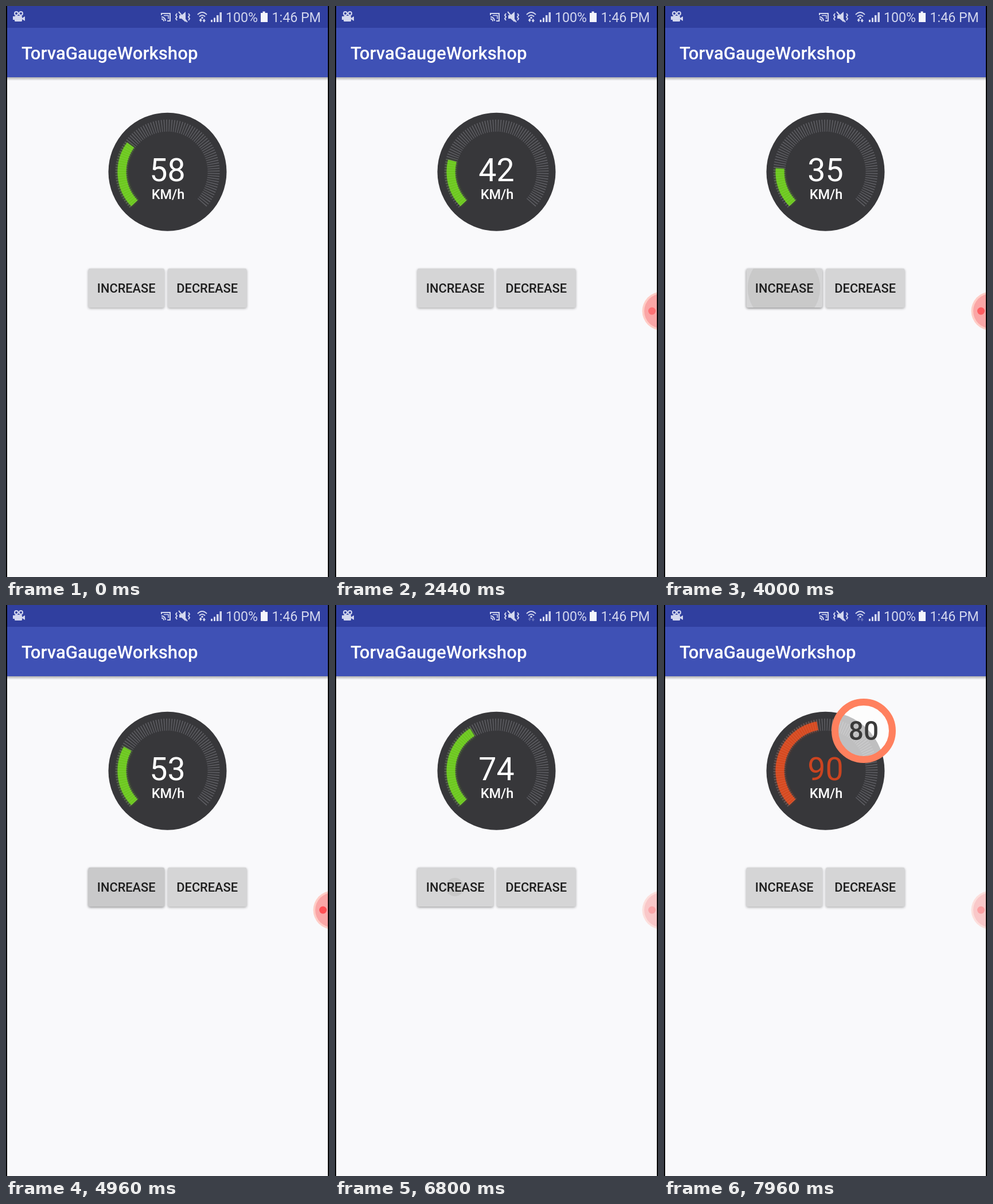
An HTML page that plays this animation: 563x994 px, repeating every 8000 ms.

```html
<!DOCTYPE html>
<html lang="en">
<head>
<meta charset="utf-8">
<title>Gauge</title>
<style>
  html, body { margin: 0; width: 100%; height: 100%; overflow: hidden; background: #000; }
  svg { display: block; width: 563px; height: 994px; font-family: Roboto, sans-serif; }
  .mid { text-anchor: middle; }
  .medium { font-weight: 500; }
  .status { fill: #d3d7ee; font-size: 23.2px; }
  .line { fill: none; stroke: #d3d7ee; stroke-width: 2; }
  .label { font-size: 21.8px; font-weight: 500; fill: #1d1d1d; }
  .arc { fill: none; }
</style>
</head>
<body>
<svg viewBox="0 0 563 994">
  <defs>
    <linearGradient id="fall" x1="0" y1="0" x2="0" y2="1">
      <stop offset="0" stop-color="#000" stop-opacity=".3"/>
      <stop offset="1" stop-color="#000" stop-opacity="0"/>
    </linearGradient>
    <filter id="soft" x="-20%" y="-20%" width="140%" height="140%"><feGaussianBlur stdDeviation="2"/></filter>
    <clipPath id="screen"><path d="M2 0H561V994H2Z"/></clipPath>
    <clipPath id="incClip"><rect x="143.5" y="457" width="132.5" height="68" rx="3"/></clipPath>
    <clipPath id="decClip"><rect x="282" y="457" width="137.5" height="68" rx="3"/></clipPath>
  </defs>

  <rect width="563" height="994"/>
  <g clip-path="url(#screen)">
    <rect width="563" height="994" fill="#f9f9fb"/>
    <rect y="124" width="563" height="6" fill="url(#fall)"/>
    <rect width="563" height="124" fill="#3f51b5"/>
    <rect width="563" height="38" fill="#303f9f"/>

    <!-- status bar -->
    <g class="status">
      <g id="camera">
        <circle cx="18" cy="13" r="3" class="line"/>
        <circle cx="26" cy="13" r="3" class="line"/>
        <rect x="15" y="17" width="13" height="10" rx="1.5"/>
        <path d="M28 21L33 18V26L28 23ZM12 18h3v6h-3z"/>
      </g>
      <g id="cast" class="line">
        <path d="M271 16V13H286V26H281M271 19a7 7 0 0 1 7 7M271 22.500a4 4 0 0 1 4 4"/>
        <path d="M275 16.500H283V22.500" stroke-width="1.500"/>
      </g>
      <g id="mute">
        <path d="M302 16H306L313 10V28L306 22H302Z"/>
        <path class="line" d="M301 10L316 28M298 13l-2 3 2 3-2 3 2 3M318 13l2 3-2 3 2 3-2 3" stroke-width="1.600"/>
      </g>
      <g id="wifi">
        <path class="line" d="M334 15Q342 7 350 15M337 18.500Q342 13.500 347 18.500" />
        <circle cx="342" cy="20.500" r="1.800"/>
        <path id="traffic" d="M336.500 24H338V22H340.500V24H342L339.200 28ZM342.500 26H344V28H346.500V26H348L345.200 22Z"/>
      </g>
      <path d="M357 28V24h3v4zM362 28V20.500h3V28zM367 28V16h3.500V28zM372.500 28V11H376V28z"/>
      <text x="383" y="27.700">100%</text>
      <path d="M444 12h3.500v-2.500h4V12H456V28H444Z" fill="#f4f5fc"/>
      <text x="463.500" y="27.700">1:46 PM</text>
    </g>
    <text class="medium" x="27" y="92.500" font-size="31.200" fill="#fff">TorvaGaugeWorkshop</text>

    <!-- gauge -->
    <circle cx="281.500" cy="288.700" r="103" fill="#37373a"/>
    <g transform="translate(281.500 288.700) rotate(136.500)">
      <path id="ticks" class="arc" stroke="#5d5d62" stroke-width="21" stroke-dasharray="1.100 1.900"/>
      <path id="glow" class="arc" stroke-width="17" opacity=".4" filter="url(#soft)"/>
      <path id="lit" class="arc" stroke-width="15"/>
      <path id="bands" class="arc" stroke="#fff" stroke-opacity=".08" stroke-width="15"/>
    </g>
    <text id="speed" class="mid" x="281.500" y="304.500" font-size="55.500"></text>
    <text class="mid medium" x="282.500" y="336" font-size="23.500" fill="#fff">KM/h</text>

    <g id="sign">
      <circle cx="348" cy="219" r="46" fill="#fff" fill-opacity=".68"/>
      <circle cx="348" cy="219" r="50" fill="none" stroke="#ff805e" stroke-width="12"/>
      <text class="mid medium" x="348" y="235" font-size="46" fill="#3a3a3a">80</text>
    </g>

    <!-- buttons -->
    <g id="inc">
      <rect class="shade" x="143.500" y="458.500" width="132.500" height="68" rx="3" filter="url(#soft)"/>
      <rect x="143.500" y="457" width="132.500" height="68" rx="3" fill="#d5d5d6"/>
      <circle class="ripple" cx="209" cy="491" clip-path="url(#incClip)"/>
      <text class="label mid" x="209.700" y="499.300">INCREASE</text>
    </g>
    <g id="dec">
      <rect class="shade" x="282" y="458.500" width="137.500" height="68" rx="3" filter="url(#soft)"/>
      <rect x="282" y="457" width="137.500" height="68" rx="3" fill="#d5d5d6"/>
      <circle class="ripple" cx="351" cy="491" clip-path="url(#decClip)"/>
      <text class="label mid" x="350.700" y="499.300">DECREASE</text>
    </g>

    <!-- floating record bubble -->
    <g id="bubble">
      <circle cx="569" cy="531" r="33.500" fill="#f9f9fb"/>
      <g id="disc">
        <circle cx="569" cy="531" r="33.500" fill="#ffcdc6"/>
        <circle cx="569" cy="531" r="30" fill="#faa6a6"/>
      </g>
      <circle id="dot" cx="552.500" cy="531" r="6.500" fill="#ff4a4f"/>
    </g>
  </g>
</svg>
<script>
const LOOP = 8000, STEP = 8, RAMP = 300, LEAD = 180;
const SWEEP = 266, DEG_PER_KMH = 1.37, LIMIT = 80;
// start time of each speed change and its direction
const taps = [
  [1270, -1], [1590, -1], [2760, -1],
  [3940, 1], [4400, 1], [4840, 1], [5600, 1], [6300, 1], [6920, 1], [7400, 1]
];

const $ = id => document.getElementById(id);
const set = (el, attrs) => { for (const k in attrs) el.setAttribute(k, attrs[k]); };
const ramp = (t, a, b) => Math.min(1, Math.max(0, (t - a) / (b - a)));
const ease = x => (1 - Math.cos(Math.PI * x)) / 2;

function arc(r, deg) {
  const a = deg * Math.PI / 180;
  return `M${r} 0A${r} ${r} 0 ${deg > 180 ? 1 : 0} 1 ${r * Math.cos(a)} ${r * Math.sin(a)}`;
}

set($('ticks'), { d: arc(80.5, SWEEP), pathLength: SWEEP });

function drawGauge(t) {
  const v = taps.reduce((sum, [at, dir]) => sum + dir * STEP * ease(ramp(t, at, at + RAMP)), 58);
  const over = v > LIMIT, deg = v * DEG_PER_KMH;
  const color = over ? '#d6491f' : '#6cc81e';
  const d = arc(79.5, deg);
  set($('lit'), { d, stroke: color });
  set($('glow'), { d, stroke: color });
  set($('bands'), { d, pathLength: deg, 'stroke-dasharray': '1.1 1.9' });
  $('speed').textContent = Math.round(v);
  set($('speed'), { fill: over ? '#cb4420' : '#fff' });
  set($('sign'), { opacity: ramp(t, 7260, 7900) });
}

function drawButton(id, dir, t) {
  const tap = taps.filter(([at, d]) => d === dir && at - LEAD <= t).pop();
  const age = tap ? t - tap[0] + LEAD : LOOP;
  const lift = Math.sin(Math.PI * ramp(age, 0, 420));
  set($(id).querySelector('.shade'), { opacity: 0.32 + 0.15 * lift });
  set($(id).querySelector('.ripple'), {
    r: 76 * ramp(age, 0, 290),
    opacity: 0.06 * (1 - ramp(age, 280, 500))
  });
}

function drawBubble(t) {
  const idle = ramp(t, 5600, 5900);
  const pulse = 0.5 + 0.5 * Math.cos(2 * Math.PI * (t - 4960) / 1120);
  set($('bubble'), { opacity: t < 160 ? 0 : 1 });
  set($('disc'), { opacity: 1 - 0.42 * idle });
  set($('dot'), { opacity: (0.2 + 0.75 * pulse) * (1 - 0.2 * idle) });
}

function draw() {
  const t = performance.now() % LOOP;
  drawGauge(t);
  drawButton('inc', 1, t);
  drawButton('dec', -1, t);
  drawBubble(t);
  const quiet = t >= 5600 && t < 6160 || t >= 6600;
  set($('traffic'), { opacity: quiet ? 0.35 : 1 });
  requestAnimationFrame(draw);
}
draw();
</script>
</body>
</html>
```
